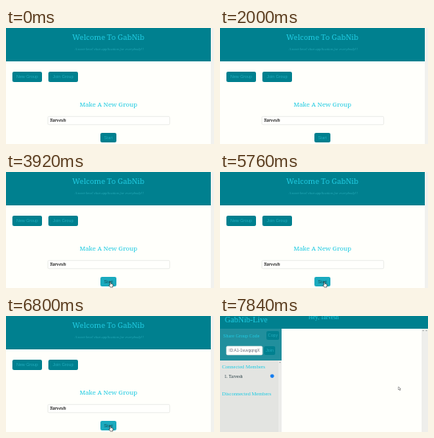
Animation of 260x146 px, one loop 8000 ms. Source, as an HTML page:

```html
<!DOCTYPE html>
<html lang="en">
<head>
<meta charset="utf-8">
<style>
  html, body { margin: 0; width: 100%; height: 100%; overflow: hidden; background: #fffffb; }
  svg { display: block; width: 100vw; height: 100vh; }
  text { fill: #20cbe2; font-family: "Liberation Serif", serif; }
  .mid { text-anchor: middle; }
  .display { font-family: "Noto Serif", serif; }
  .label { font: 5.3px "Liberation Sans", sans-serif; text-anchor: middle; fill: #21aabc; }
  .script { font-style: italic; }
  .teal { fill: #00808f; }
  .field { fill: #fffffd; stroke: #dedfdc; stroke-width: .6; }
  .heading { font-size: 6.5px; }
</style>
</head>
<body>
<svg viewBox="0 0 260 146" preserveAspectRatio="none">
  <g id="lobby">
    <rect width="260" height="146" fill="#fffffb"/>
    <rect class="teal" width="256" height="42"/>
    <rect x="256" width="4" height="146" fill="#f1f1ee"/>
    <text class="mid display" x="128" y="15" font-size="9.4">Welcome To GabNib</text>
    <text class="mid script" x="129" y="28" font-size="4.8" style="fill:#25a9b8">A next-level chat application for everybody!!</text>
    <g id="tabs"></g>
    <text class="mid display" x="128" y="99" font-size="7.8">Make A New Group</text>
    <rect class="field" x="52.3" y="111.3" width="152.4" height="10.4" rx="1.5"/>
    <text class="script" x="54.5" y="118.4" font-size="6.3" font-weight="bold" style="fill:#222">Tarvesh</text>
    <rect id="start" x="118" y="132" width="20" height="12" rx="2"/>
    <text id="startLabel" class="label" x="128" y="140">Start</text>
  </g>

  <g id="room">
    <rect width="260" height="146" fill="#fffffb"/>
    <rect y="16" width="77" height="40" fill="#218f9d"/>
    <rect y="56" width="77" height="90" fill="#e3e4e1"/>
    <rect x="73" y="56" width="4" height="90" fill="#ececea"/>
    <rect x="252" y="16" width="8" height="130" fill="#eeeeeb"/>
    <rect class="teal" width="260" height="16"/>
    <path d="M74 59l1-1.5 1 1.5zM253 19l1-1.5 1 1.5zM257 19l1-1.5 1 1.5z" fill="#999"/>
    <text x="6" y="8" font-size="10">GabNib-Live</text>
    <text class="mid" x="129.5" y="3.5" font-size="7.2">Hey, Tarvesh</text>
    <text x="4" y="27" font-size="6.1">Share Group Code</text>
    <g id="codeButtons"></g>
    <rect class="field" x="8" y="38" width="45" height="11" rx="1.5"/>
    <text class="label" x="30.5" y="45.4" style="fill:#667;font-size:4.9px">ID:A1-1vuvgqngX</text>
    <text class="heading" x="2.5" y="66">Connected Members</text>
    <g id="member">
      <text x="5.5" y="78.2" font-size="5.5" style="fill:#243b40">1.</text>
      <text x="11" y="78.2" font-size="5.5" style="fill:#243b40">Tarvesh</text>
      <circle cx="65.2" cy="75.6" r="2.4" fill="#147df0"/>
    </g>
    <text id="offline" class="heading" x="2.5">Disconnected Members</text>
  </g>

  <path id="hand" d="M0 0v4l-1-.7-.5.6L.4 6.5h3L4 3 1 2V0z" fill="#fff" stroke="#222" stroke-width=".6"/>
  <path id="arrow" d="M0 0v4l1-.9.7 1.6.8-.4-.7-1.5h1.3z" fill="#fff" stroke="#555" stroke-width=".5"/>
</svg>
<script>
const LOOP = 8000;
const HOVER = 2800, ENTER = 6880, JOINED = 7360, MOVED = 7600;
const $ = id => document.getElementById(id);

const button = (x, y, w, h, label) =>
  `<rect class="teal" x="${x}" y="${y}" width="${w}" height="${h}" rx="2"/>
   <text class="label" x="${x + w / 2}" y="${y + h / 2 + 1.9}">${label}</text>`;
$("tabs").innerHTML = button(8, 55, 37, 13, "New Group") + button(53, 55, 37, 13, "Join Group");
$("codeButtons").innerHTML = button(58, 19, 16, 11, "Copy") + button(55, 38, 14, 11, "Join");

const show = (id, on) => $(id).style.display = on ? "" : "none";
const place = (id, x, y) => $(id).setAttribute("transform", `translate(${x} ${y})`);
const mix = (a, b, k) => `rgb(${a.map((v, i) => Math.round(v + (b[i] - v) * k))})`;

function draw(t) {
  const inRoom = t >= ENTER, joined = t >= JOINED, moved = t >= MOVED;
  const hover = t < HOVER ? 0 : Math.min(1, (t - HOVER + 80) / 240);

  show("lobby", !inRoom);
  show("room", inRoom);
  $("start").style.fill = mix([0, 128, 143], [27, 170, 190], hover);
  $("startLabel").style.fill = mix([33, 170, 188], [18, 82, 94], hover);

  show("member", joined);
  $("offline").setAttribute("y", joined ? 100 : 88);

  show("hand", !inRoom && hover > 0);
  place("hand", 130, 138.5);
  show("arrow", inRoom);
  place("arrow", moved ? 223 : 129, moved ? 89 : 140);
}

function tick() {
  draw(performance.now() % LOOP);
  requestAnimationFrame(tick);
}
tick();
</script>
</body>
</html>
```
